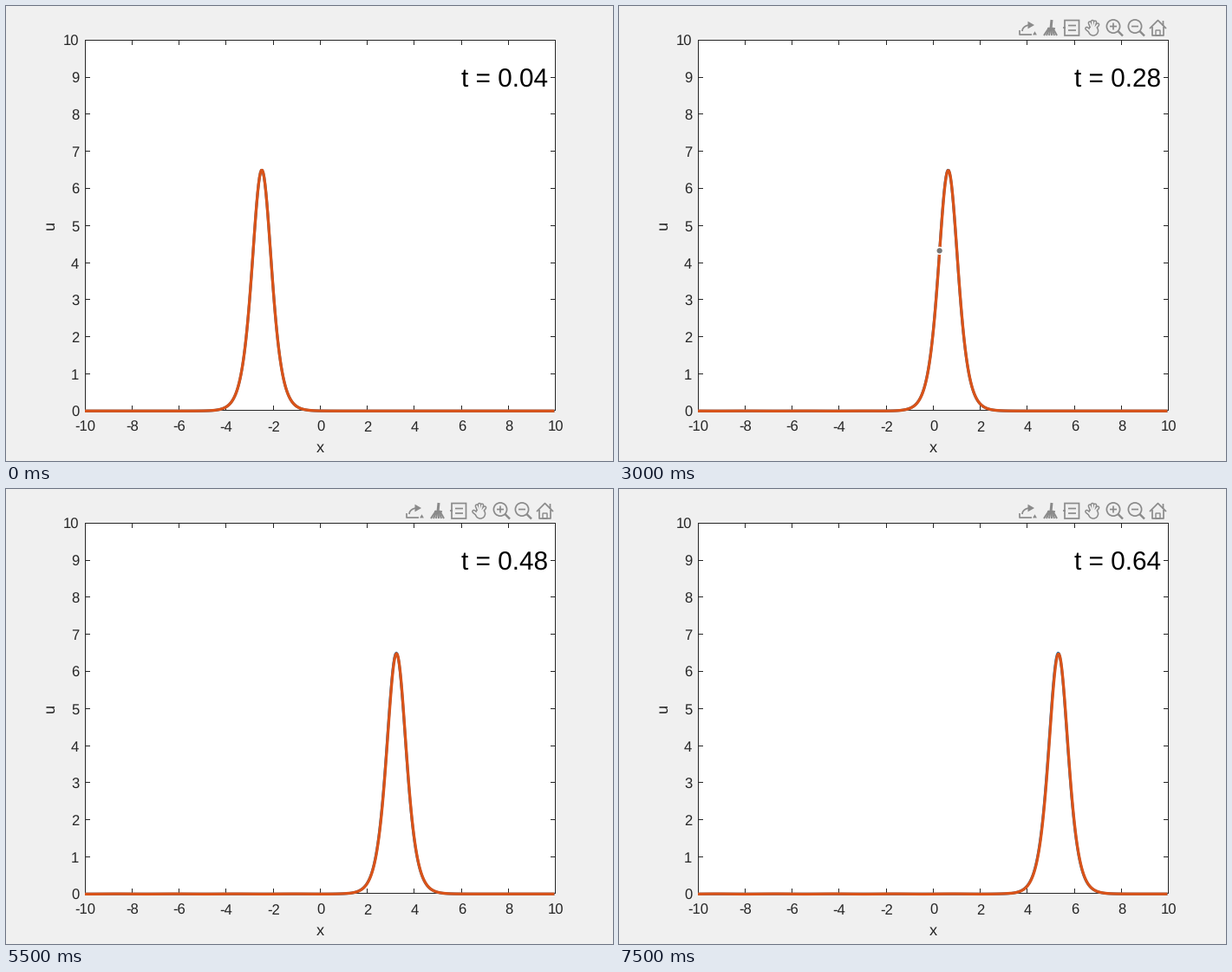
A matplotlib script for the animation above (8000 ms loop, 700 px wide and 525 px high).

```python
import numpy as np
import matplotlib.pyplot as plt
from matplotlib.animation import FuncAnimation
from matplotlib.patches import Circle, Rectangle, RegularPolygon

W, H, DPI = 700, 525, 100
LEFT, RIGHT, TOP, BOTTOM = 91.5, 633.5, 39.5, 466.5
INK, GREY, BACK = "#262626", "#8a8a8a", "#f0f0f0"
BLUE, ORANGE = "#0072bd", "#d95319"
SPEED, START = 13.0, -3.0
FRAMES, STEP_MS, DT = 16, 500, 0.04
HOVER, HOVER_X = 6, 0.2734

plt.rcParams.update({"font.family": "Liberation Sans",
                     "text.hinting": "no_hinting",
                     "path.simplify": False,
                     "lines.solid_capstyle": "butt"})


def pt(px):
    return px * 72 / DPI


def to_x(x):
    return 91 + (x + 10) * 27.125


def to_y(u):
    return 467.25 - u * 42.7875


def pixel(v):
    return np.floor(v) + 0.5


fig = plt.figure(figsize=(W / DPI, H / DPI), dpi=DPI, facecolor=BACK)
ax = fig.add_axes([0, 0, 1, 1])
ax.set(xlim=(0, W), ylim=(H, 0))
ax.axis("off")


def stroke(xs, ys, color=GREY, width=1.7, **kw):
    kw.setdefault("snap", False)
    return ax.plot(xs, ys, color=color, lw=pt(width), **kw)[0]


def box(x, y, w, h, fc="none", ec=GREY, width=1.7):
    return ax.add_patch(Rectangle((x, y), w, h, fc=fc, ec=ec, lw=pt(width), snap=False))


def label(x, y, s, size, color=INK, **kw):
    return ax.text(x, y, s, fontsize=pt(size), color=color, va="baseline", **kw)


def draw_axes():
    box(LEFT, TOP, RIGHT - LEFT, BOTTOM - TOP, "white", INK, 1)
    for v in range(-10, 11, 2):
        x = min(pixel(to_x(v)), RIGHT)
        for edge, inward in ((TOP, 5.5), (BOTTOM, -5.5)):
            stroke([x, x], [edge, edge + inward], INK, 1)
        label(to_x(v) + 0.3, 491, str(v), 16.67, ha="center")
    for v in range(11):
        y = min(pixel(to_y(v)), BOTTOM)
        for edge, inward in ((LEFT, 5.5), (RIGHT, -5.5)):
            stroke([edge, edge + inward], [y, y], INK, 1)
        label(84.3, to_y(v) + 6.6, str(v), 16.67, ha="right")
    label(362.5, 515, "x", 18.3, ha="center")
    label(55.5, 253, "u", 18.3, ha="center", rotation=90, rotation_mode="anchor")


def share(cx, cy):
    a = np.linspace(0, np.pi / 2, 12)
    return [stroke(cx + 3 - 9 * np.cos(a), cy + 4 - 7 * np.sin(a)),
            ax.add_patch(RegularPolygon((cx + 3, cy - 3), 3, radius=5,
                                        orientation=-np.pi / 2, fc=GREY, ec="none")),
            stroke([cx - 9, cx - 9, cx + 5], [cy + 3, cy + 8, cy + 8]),
            ax.add_patch(RegularPolygon((cx + 8.5, cy + 7), 3, radius=2.8,
                                        orientation=np.pi, fc=GREY, ec="none"))]


def brush(cx, cy):
    spread = np.linspace(0, 1, 6)
    hairs = [stroke([cx - 2 + 4 * s, cx - 8 + 15 * s], [cy, cy + 9], width=2)
             for s in spread]
    return hairs + [stroke([cx + 1, cx], [cy - 9, cy + 1], width=3),
                    stroke([cx - 4, cx + 5], [cy + 1, cy + 1])]


def data_tip(cx, cy):
    return [box(cx - 8, cy - 8.5, 16.5, 17.5),
            *(stroke([cx - 4, cx + 5], [cy + d, cy + d]) for d in (-2.5, 3)),
            stroke([cx - 10, cx - 7], [cy, cy])]


def hand(cx, cy):
    # a wide grey pass, then a narrower one, leaves only the outline
    parts = []
    for color, shrink in ((GREY, 0), (BACK, 3)):
        for k in range(4):
            x = cx - 3.5 + 3 * k
            tip = cy - 7 + 1.1 * (k - 1.2) ** 2
            parts.append(stroke([x, cx], [tip, cy + 3], color, 4.8 - shrink,
                                solid_capstyle="round"))
        parts.append(stroke([cx - 7, cx - 1], [cy + 1, cy + 6], color, 4.8 - shrink,
                            solid_capstyle="round"))
        parts.append(ax.add_patch(Circle((cx + 0.5, cy + 3.5), 6.3 - shrink / 2,
                                         fc=color, ec="none", zorder=2)))
    return parts


def magnifier(cx, cy, plus):
    x, y = cx - 1, cy - 1.5
    parts = [ax.add_patch(Circle((x, y), 7.6, fill=False, ec=GREY, lw=pt(1.7))),
             stroke([x + 5.5, x + 11], [y + 5.5, y + 11], width=2.4),
             stroke([x - 4, x + 4], [y, y])]
    if plus:
        parts.append(stroke([x, x], [y - 4, y + 4]))
    return parts


def home(cx, cy):
    return [stroke([cx - 9.5, cx, cx + 9.5], [cy + 1, cy - 8.5, cy + 1]),
            stroke([cx + 6, cx + 6], [cy - 8, cy - 2]),
            stroke([cx - 6.5, cx - 6.5, cx + 6.5, cx + 6.5],
                   [cy - 1, cy + 9, cy + 9, cy - 1]),
            box(cx - 2.5, cy + 3, 5, 6, width=1.4)]


def draw_toolbar(cy=25):
    return [*share(471, cy), *brush(498, cy), *data_tip(522, cy), *hand(546.5, cy),
            *magnifier(571, cy, True), *magnifier(596, cy, False), *home(621.5, cy)]


def soliton(x, t):
    z = np.sqrt(SPEED) / 2 * (x - START - SPEED * t)
    return SPEED / 2 / np.cosh(z) ** 2


draw_axes()
toolbar = draw_toolbar()
grid = np.linspace(-10, 10, 512, endpoint=False)
exact, solved = (stroke(to_x(grid), 0 * grid, color, width, zorder=5,
                        solid_joinstyle="round")
                 for color, width in ((BLUE, 3.0), (ORANGE, 3.33)))
clock = label(525, 94, "", 29.7, "black", zorder=7)
hover_at = to_x(HOVER_X), to_y(soliton(HOVER_X, (HOVER + 1) * DT))
marker = ax.add_patch(Circle(hover_at, 3.9, fc="#777777", ec="white",
                             lw=pt(1.5), zorder=8))


def update(i):
    t = (i + 1) * DT
    # the numerical wave drifts ahead, shrinks and sheds a faint ripple
    behind = grid < START + SPEED * t - 2
    ripple = 0.005 * t * np.sin(2.5 * grid + 9 * t) * behind
    exact.set_ydata(to_y(soliton(grid, t)))
    solved.set_ydata(to_y(soliton(grid - 0.015 * t, t) * (1 - 0.005 * t) + ripple))
    clock.set_text(f"t = {t:.2f}")
    marker.set_visible(i == HOVER)
    for part in toolbar:
        part.set_visible(i >= HOVER)
    return [exact, solved, clock, marker, *toolbar]


anim = FuncAnimation(fig, update, frames=FRAMES, interval=STEP_MS,
                     repeat=True, repeat_delay=0, blit=False)
plt.show()
```
